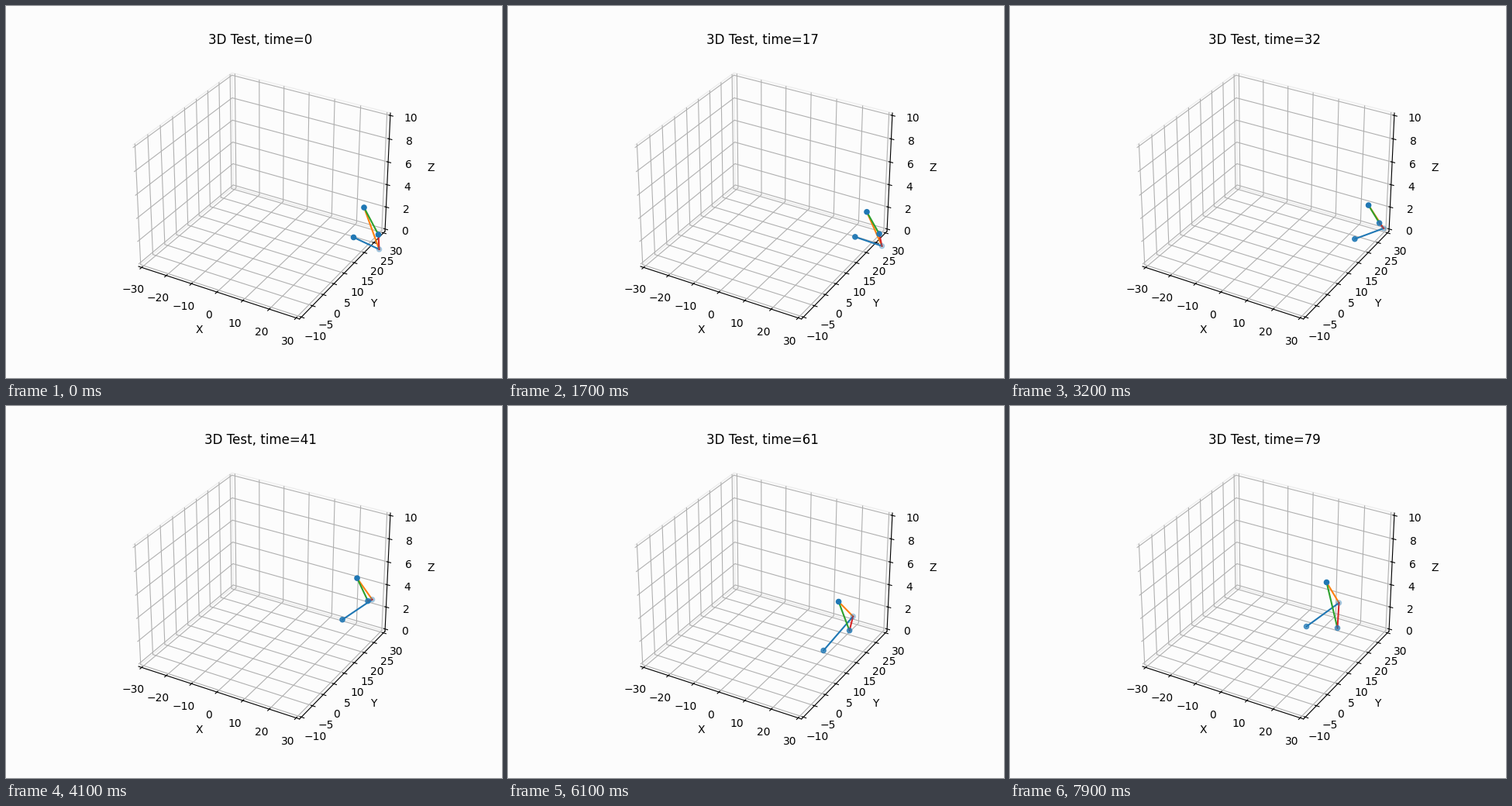
Write a matplotlib script that moves like this. It is 640x480 px and loops after 8000 ms.

```python
import numpy as np
import matplotlib.pyplot as plt
from matplotlib.animation import FuncAnimation
from matplotlib.colors import to_rgba

FRAMES, INTERVAL = 80, 100
W, H, DPI = 640, 480, 100
BG = "#fcfcfc"
BONES = [(0, 1), (1, 2), (2, 3), (3, 1)]

plt.rcParams["font.family"] = "DejaVu Sans"
plt.rcParams["axes3d.automargin"] = True


def glide(t, value, *moves):
    """Start at value, then add each eased move (begin, end, change)."""
    for begin, end, change in moves:
        u = np.clip((t - begin) / (end - begin), 0, 1)
        value += change * u * u * (3 - 2 * u)
    return value


def pose(t):
    """Joints A, B, C, D in stage pixels; C leads, the others hang from it."""
    # C drifts left in two steps: crouch, hop, fall, second hop
    c = np.array([
        glide(t, 461.5, (0, 17, 1), (30, 62, -36.5), (68, 79, -18)),
        glide(t, 259.5, (0, 30, 9.5), (27, 42, -48), (43, 61, 31),
              (62, 79, -25)),
    ])
    a = (glide(t, -13.5, (0, 50, -6), (69, 79, -6.5)),
         glide(t, 38.5, (0, 17, -6.5), (15, 56, 31), (69, 79, -6)))
    b = (glide(t, 19.5, (57, 69, -3.5)),
         glide(t, 54, (0, 10, -10), (26, 33, -15), (35, 61, -10),
               (64, 79, 7.5)))
    d = (glide(t, 18.5, (0, 32, -4.5)),
         glide(t, 35, (0, 32, -12), (32, 50, 13), (58, 79, 23)))
    return np.array([c + a, c + b, c, c + d])


def shades(t):
    """Marker colours, fainter with depth."""
    u = t / FRAMES
    alphas = (0.97 - 0.27 * u, 0.3, 1, 1 - 0.35 * u)
    return [to_rgba("C0", k) for k in alphas]


fig = plt.figure(figsize=(W / DPI, H / DPI), dpi=DPI, facecolor=BG)
ax = fig.add_subplot(projection="3d")
ax.patch.set_facecolor("none")
ax.set(xlim=(-30, 30), ylim=(-10, 30), zlim=(0, 10),
       xlabel="X", ylabel="Y", zlabel="Z",
       xticks=range(-30, 31, 10), yticks=range(-10, 31, 5),
       zticks=range(0, 11, 2))
for axis in (ax.xaxis, ax.yaxis, ax.zaxis):
    axis.pane.set(alpha=1, facecolor="none", edgecolor="#eeeeee")
title = ax.set_title("3D Test, time=0")

# Flat layer above the 3D box, whole numbers at pixel centres
stage = fig.add_axes([0, 0, 1, 1])
stage.set(xlim=(-0.5, W - 0.5), ylim=(H - 0.5, -0.5))
stage.axis("off")
lines = [stage.plot([], [], color=f"C{k}", lw=1.5)[0]
         for k in range(len(BONES))]
dots = stage.scatter(*pose(0).T, s=20, c=shades(0), zorder=3)


def update(t):
    joints = pose(t)
    for line, bone in zip(lines, BONES):
        line.set_data(*joints[list(bone)].T)
    dots.set_offsets(joints)
    dots.set_facecolors(shades(t))
    dots.set_edgecolors("face")
    title.set_text(f"3D Test, time={t}")
    return [*lines, dots, title]


anim = FuncAnimation(fig, update, frames=FRAMES, interval=INTERVAL,
                     repeat=True, repeat_delay=0, blit=False)
plt.show()
```
